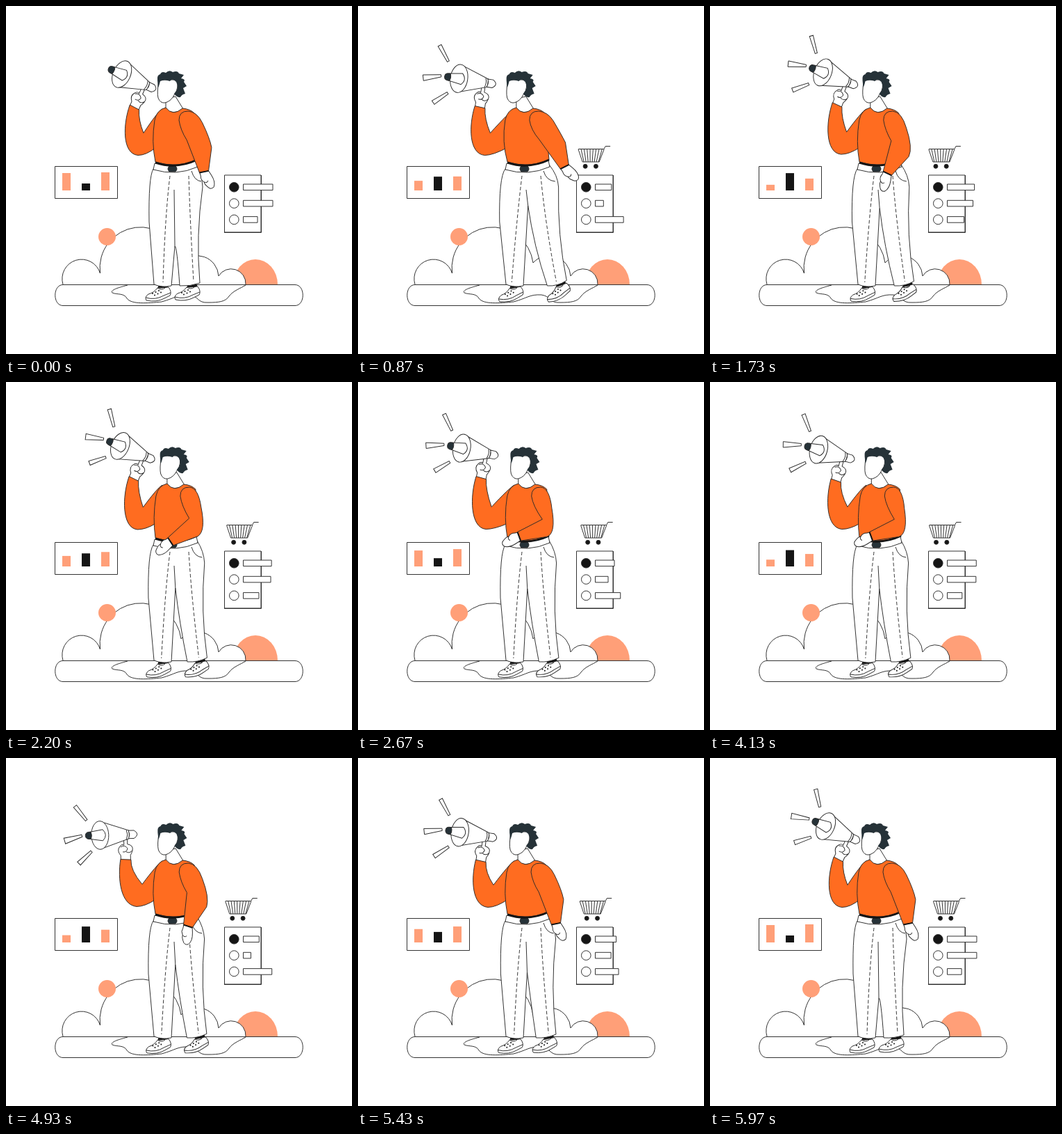
An HTML page with a canvas for the animation above (6010 ms loop, 498 by 500 pixels).

```html
<!DOCTYPE html>
<html>
<head>
<meta charset="utf-8">
<style>
html, body { margin: 0; width: 100%; height: 100%; overflow: hidden; background: #fff; }
canvas { display: block; }
</style>
</head>
<body>
<canvas width="498" height="500"></canvas>
<script>
const ctx = document.querySelector('canvas').getContext('2d');
const LOOP = 6010;
const ORANGE = '#ff6c20', PEACH = '#ff9f78', DARK = '#263238', INK = '#151515', LINE = '#2a2a2a', WHITE = '#fff';

const wave = (t, cycles) => (1 - Math.cos(t / LOOP * cycles * 2 * Math.PI)) / 2;
const rad = deg => deg * Math.PI / 180;

// Smooth step from 0 to 1 between two times.
function ramp(t, from, to) {
  const s = Math.min(1, Math.max(0, (t - from) / (to - from)));
  return s * s * (3 - 2 * s);
}

function path(d, fill, stroke = LINE, width = .95) {
  const p = new Path2D(d);
  if (fill) { ctx.fillStyle = fill; ctx.fill(p); }
  if (stroke) { ctx.strokeStyle = stroke; ctx.lineWidth = width; ctx.stroke(p); }
}

function oval(x, y, rx, ry, fill, stroke = LINE) {
  ctx.beginPath();
  ctx.ellipse(x, y, rx, ry, 0, 0, 2 * Math.PI);
  if (fill) { ctx.fillStyle = fill; ctx.fill(); }
  if (stroke) { ctx.strokeStyle = stroke; ctx.lineWidth = .95; ctx.stroke(); }
}

const box = (x, y, w, h, fill, stroke) => path(`M${x},${y}h${w}v${h}h${-w}z`, fill, stroke);

function placed(x, y, angle, draw, scale = 1) {
  ctx.save();
  ctx.translate(x, y);
  ctx.rotate(angle);
  ctx.scale(scale, scale);
  draw();
  ctx.restore();
}

function scenery() {
  path('M327,400A32,36 0 0 1 391,400Z', PEACH, null);
  path('M82,400A27.9,27.9 0 0 1 135.5,384A58,58 0 1 1 252,369A31,31 0 0 1 306,388A21,21 0 0 1 345,400', WHITE);
  oval(145.5, 331.5, 12.5, 12.5, PEACH, null);
  path('M82,400.5H416C431,400.5 431,430.5 416,430.5H82C67,430.5 67,400.5 82,400.5Z', WHITE);
  path('M175,401C164,404 149,408 153,412C159,415 170,412 174,420C180,429 204,427 224,425C243,420 247,414 264,415C278,417 275,427 291,426C306,426 316,425 321,417C327,409 337,406 345,401');
}

function chart(t) {
  const u = wave(t, 2) * 1.05;
  box(70.5, 230.5, 90, 46, WHITE);
  [25 - 17 * u, 10 + 15 * u, 26 - 9 * u]
    .forEach((h, i) => box(81 + 28 * i, 265, 12, -h, i === 1 ? INK : PEACH, null));
}

function controls(t) {
  const v = wave(t, 3);
  box(314.5, 243, 52.5, 82, WHITE);
  path('M367.5,243V325.5H314');
  [384 - 20 * v, 384 - 32 * v, 362 + 21 * v].forEach((end, i) => {
    const y = 260.3 + 23.3 * i;
    oval(328.3, y, 6.8, 6.8, i ? WHITE : INK);
    box(341.5, y - 4.3, end - 341.5, 8.6, WHITE);
  });
}

function cart(t, grow) {
  placed(339.5 - 7 * wave(t, 2), 217, 0, () => {
    path('M-18,-11.5H19L21,-15.5H28M-18,-11L-12,7H12L19,-11');
    for (let i = 0; i < 8; i++) path(`M${-14 + i * 4.3},-11L${-10 + i * 3},7`);
    oval(-8, 13.3, 3, 3, INK);
    oval(7.3, 13.3, 3, 3, INK);
  }, grow);
}

function shoe(x, y, angle) {
  placed(x, y, angle, () => {
    path('M-7,2Q-12,9 -20,11Q-26,15 -23,20Q-8,23 3,17L11,13Q14,8 9,1Z', WHITE);
    path('M-24,16Q-10,20 2,13L12,9M-7,2Q-1,6 4,2');
    path('M-6,0Q0,2 8,-1', null, INK, 3);
    for (let i = 0; i < 6; i++) oval(-14 + i % 3 * 4.5 + (i > 2 ? 3 : 0), 10 - i % 3 * 2 + (i > 2 ? 2.5 : 0), 1, 1, INK, null);
  });
}

function legs(f) {
  const fork = `${243 + f * .06},${285 + 60 * Math.exp(-f / 8)}`;
  shoe(225, 403, -f * .003);
  shoe(267 + f * .86, 402 - f * .08, -f * .01);
  path(`M212,234Q${205 - f * .08},246 ${206 - f * .08},310L213,400Q225,405 238,402L${fork}
    Q${246 + f * .25},345 ${250 + f * .8},402Q${265 + f * .8},403 ${279 + f * .76},${398 - f * .13}
    Q${273 + f * .5},330 ${283 + f * .2},260Q${282 + f * .2},243 275,228Z`, WHITE);
  path(`M242,264L${fork}M267,237Q271,251 ${281 + f * .1},252`);
  ctx.setLineDash([5, 3]);
  path(`M236,244Q229,300 ${226 - f * .17},397M263,244Q${265 + f * .15},310 ${270 + f * .55},396`);
  ctx.setLineDash([]);
  path('M214,226L212,235Q245,245 276,231L274,222Z', WHITE);
  path('M235,230H244Q248,234 244,238H235Q231,234 235,230Z', DARK);
}

function rays(grow) {
  const ray = (x, y, angle, length, half) => placed(x, y, rad(angle), () =>
    path(`M0,-1.6L${length},${-half}V${half}L0,1.6Z`, WHITE));
  placed(-71, 0, 0, () => {
    ray(-2, -22, -127, 26, 2.7);
    ray(-9, 0, 165, 26, 4.2);
    ray(4, 23, 138, 25, 3.2);
  }, grow);
}

function horn(grow) {
  path('M-25,37V30Q-31,23 -26,17Q-23,13 -20,15L-20,7L-15,7L-15,14Q-6,16 -8,23Q-9,27 -11,30V37Z', WHITE);
  path('M-25,18Q-19,14 -15,20Q-16,26 -22,25M-8,23Q-12,28 -17,25');
  path('M-54,-20L-12,-5.5V6L-54,20Z', WHITE);
  path('M-13,-5.5H-5Q4,0 -5,6H-13Q-10,0 -13,-5.5ZM-16,-6.5Q-13,0 -16,7', WHITE);
  oval(-54, 0, 12.5, 20.3, WHITE);
  path('M-69,-5L-50,-8Q-42,0 -50,8L-69,5Z', WHITE);
  path('M-67,-5Q-75,-6 -75,0Q-75,6 -67,5Q-65,0 -67,-5Z', DARK);
  if (grow) rays(grow);
}

function hornArm(mx, my, angle, ex, ey, grow) {
  const c = Math.cos(angle), s = Math.sin(angle);
  const at = (x, y) => [mx + x * c - y * s, my + x * s + y * c];
  const [x1, y1] = at(-25.5, 35.5), [x2, y2] = at(-10.5, 36.5);
  placed(mx, my, angle, () => horn(grow));
  path(`M${x1},${y1}C${(x1 + ex) / 2 - 16},${y1 + 28} ${ex - 23},${ey - 2} ${ex},${ey}
    Q${ex + 12},${ey} 216,203L225,148Q218,152 ${ex + 8},${ey - 32}Q${x2 - 1},${y2 + 15} ${x2},${y2}Z`, ORANGE);
}

function torso(d) {
  path(`M${230 + d},133V148Q240,158 ${255 + d},148L${244 + d},130Z`, WHITE);
  path(`M${230 + d},146Q${217 + d},149 ${214 + d},164Q${209 + d},195 215,224Q245,234 275,221
    L${271 + d},154Q${265 + d},148 ${254 + d},147Q${240 + d},159 ${230 + d},146Z`, ORANGE);
  path('M215,225Q245,235 275,221', null, INK, 3);
}

function head(dx) {
  placed(dx, 0, 0, () => {
    path('M220,106Q217,125 219,132Q222,140 229,139Q238,137 243,126Q249,118 246,106Z', WHITE);
    path('M218,107Q217,99 222,98Q224,93 230,96Q235,91 240,95Q247,92 249,97L256,99L252,104Q259,105 256,109L260,115L255,118L258,126Q253,127 251,131Q246,132 242,126Q250,119 245,109Q239,103 236,108Q228,105 222,108Q220,116 219,117Z', DARK, null);
  });
}

// The forearm swings about the elbow; sleeve and hand follow its angle.
function freeArm(d, bend) {
  const a = rad(bend), c = Math.cos(a), s = Math.sin(a);
  const ex = 276, ey = 192 + (bend - 79) * .17;
  const wx = ex + 47 * c, wy = ey + 47 * s;
  const cuff = `${wx + 6.7 * s},${wy - 6.7 * c}`, inner = `${wx - 6.7 * s},${wy + 6.7 * c}`;
  const ox = ex + 5 + 12.5 * s, oy = ey - 12.5 * c;
  const sx = 262 + d;
  placed(wx, wy, rad(bend * 1.12 - 27), () => {
    path('M-2,-6L9,-7Q21,-8 26,-2Q28,4 21,6Q17,8 13,7Q8,10 3,7L-2,6Z', WHITE);
    path('M13,7Q17,4 14,1');
  });
  path(`M${sx},151Q${sx + 13},152 ${(sx + ox) / 2 + 5},${(152 + oy) / 2 - 3}
    Q${ox},${oy} ${ox + 14 * c},${oy + 14 * s}L${cuff}L${inner}
    L${ex - 8 - 8 * s},${ey - 1 + 8 * c}Q${251 + d},178 ${249 + d},164Q${249 + d},151 ${sx},151Z`, ORANGE);
  path(`M${cuff}L${inner}`, null, INK, 2);
}

function draw(now) {
  const t = now % LOOP;
  const sway = wave(t, 3);
  const grow = ramp(t, 250, 770);
  const reach = ramp(t, 0, 870) - ramp(t, 870, 1800);
  const hold = ramp(t, 900, 2650) - ramp(t, 4150, 5450);
  const droop = ramp(t, 2400, 4900) - ramp(t, 4900, 6000);
  const lean = ramp(t, 900, 2600) - ramp(t, 5000, 6000);
  const step = 28 * ramp(t, 0, 870) - 15 * ramp(t, 870, 2400) - 13 * ramp(t, 5000, 6000);
  const headX = 4.8 * lean - 4.5 * sway;

  ctx.fillStyle = WHITE;
  ctx.fillRect(0, 0, 498, 500);
  scenery();
  chart(t);
  controls(t);
  if (grow) cart(t, grow);
  legs(step);
  hornArm(216 - 18 * sway - 9 * droop, 120 - 8 * sway - 8 * hold, rad(24 - 16 * sway - 10 * droop),
    190 - 8 * sway + 6 * sway * droop, 214.5 - 3 * hold, grow);
  torso(headX / 2);
  head(headX);
  freeArm(headX / 2, 79 - 16 * reach + 81 * hold);
}

const start = performance.now();
(function frame() {
  draw(performance.now() - start);
  requestAnimationFrame(frame);
})();
</script>
</body>
</html>
```
